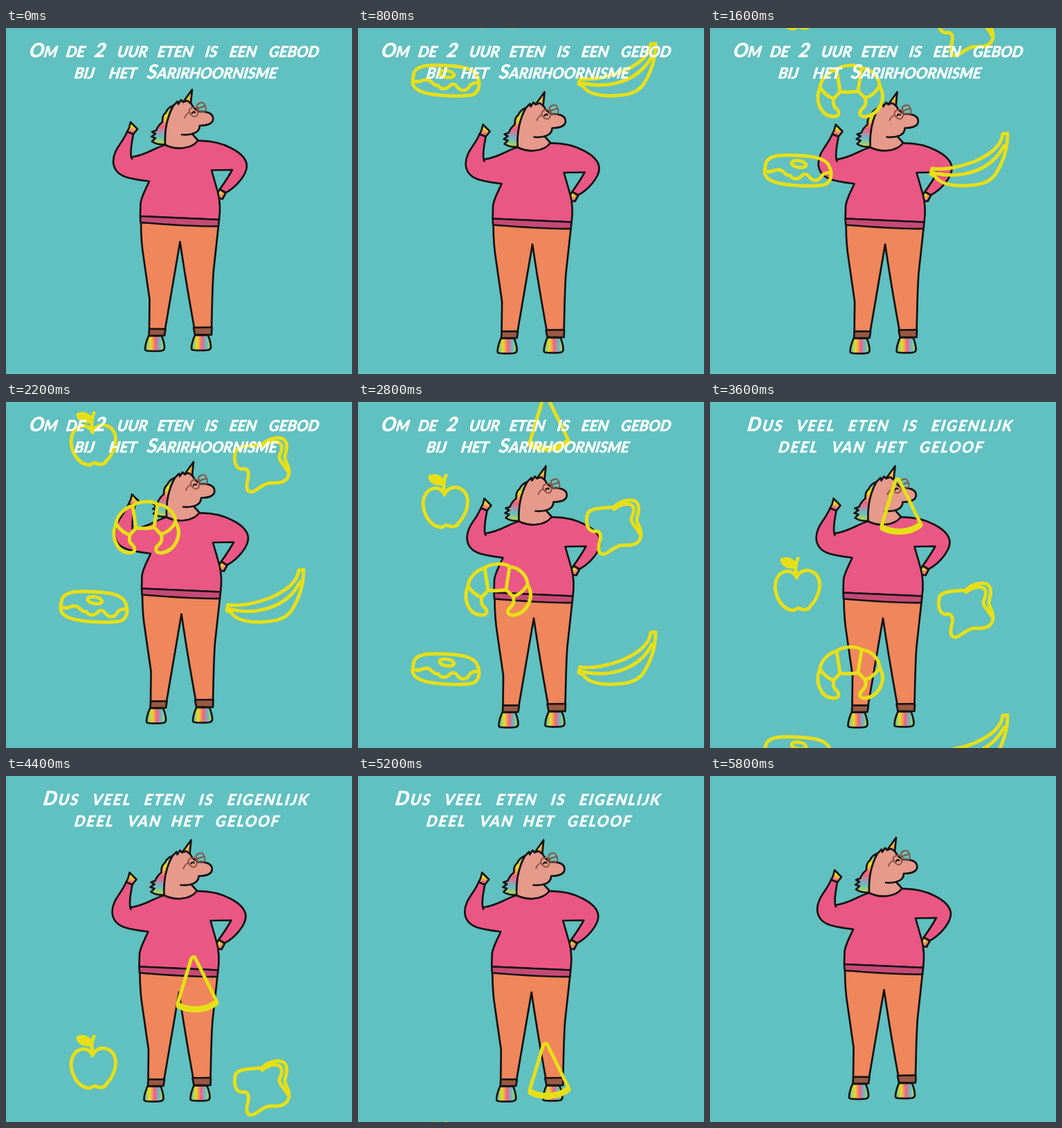
An HTML page with a canvas that plays this animation: 500x500 px, repeating every 6 s.

```html
<!DOCTYPE html>
<html lang="nl">
<head>
<meta charset="utf-8">
<title>Om de 2 uur eten</title>
<style>
html, body { margin: 0; width: 100%; height: 100%; overflow: hidden; background: #61c0c0; }
canvas { display: block; width: 100vw; height: 100vh; }
</style>
</head>
<body>
<canvas id="stage" width="500" height="500"></canvas>
<script>
const ctx = document.getElementById('stage').getContext('2d');
const LOOP = 6000, STEP = 200;
const INK = '#151313', YELLOW = '#e6df17', SKIN = '#e59a8b', PINK = '#ea5785',
      HEM = '#c64a76', ORANGE = '#f0865b', CUFF = '#9a5942', FRAME = '#87513f';
const HUES = ['#63bfc4', '#a5cf6a', '#e6df17', '#f3a05c', '#f2607f', '#b08fa8'];

function rainbow(x0, y0, x1, y1, bands) {
  const g = ctx.createLinearGradient(x0, y0, x1, y1);
  for (let i = 0; i <= bands; i++) g.addColorStop(i / bands, HUES[i % HUES.length]);
  return g;
}

function shape(d, fill, stroke = INK, width = 2.7) {
  const p = new Path2D(d);
  if (fill) { ctx.fillStyle = fill; ctx.fill(p); }
  if (stroke) { ctx.strokeStyle = stroke; ctx.lineWidth = width; ctx.stroke(p); }
}

// Linear interpolation over [time, value] pairs
function track(keys, t) {
  for (let i = 1; i < keys.length; i++) {
    const [t0, a] = keys[i - 1], [t1, b] = keys[i];
    if (t <= t1) return a + (b - a) * (t - t0) / (t1 - t0);
  }
  return keys[keys.length - 1][1];
}

const shoe = (x, y) => `M${x + 5} ${y}C${x + 2} ${y + 7} ${x} ${y + 13} ${x} ${y + 19}` +
  `C${x} ${y + 22} ${x + 3} ${y + 21.5} ${x + 14} ${y + 22}C${x + 25} ${y + 22} ${x + 28} ${y + 21} ${x + 28} ${y + 17}` +
  `C${x + 28} ${y + 11} ${x + 26} ${y + 5} ${x + 24} ${y}Z`;

function drawLegs() {
  shape(shoe(201, 445), rainbow(202, 0, 230, 0, 8));
  shape(shoe(268, 444), rainbow(269, 0, 297, 0, 8));
  shape('M195 281C195 300 196 315 199 333L207.500 392L207 435L230 435L251.500 309Q259.500 364 272 433' +
    'L297 433C298 400 298 375 300 350L307 286Z', ORANGE);
  shape('M207 435L230.500 435L229 444.500L206.500 444.500Z', CUFF);
  shape('M271 433L297.500 432.500L297 443.500L273 443Z', CUFF);
}

function drawHead() {
  // mane
  shape('M242 112C236 114 233 117 231 122C226 126 226 131 226 136C222 139 219 143 217 148' +
    'L211 150L216 153L210 157L216 159L211 164C217 168 223 169 231 168C229 147 234 128 242 112Z',
    rainbow(226, 112, 222, 172, 8));
  // face and neck
  shape('M230 169C229 147 233 128 242 112L248 106L249 110L253 104L256 107L260 103L267 108' +
    'C269 113 273 118 280 121C289 120 298 123 299 129C301 137 293 141 280 141' +
    'C280 146 277 151 269 153L278 163C268 175 246 177 230 169Z', SKIN);
  shape('M254 154C260 155 265 154 270 153');
  // horn
  shape('M256 107L269 89L267 109L262 105Z', rainbow(256, 98, 272, 104, 5));
  // glasses
  shape('M265 118C268 114 274 113 276 117C278 121 278 126 274 128C270 129 264 124 265 118Z', null, FRAME, 1.9);
  shape('M276 112C277 109 284 106 286 109C288 112 290 117 288 120C285 122 280 122 278 119Z', null, FRAME, 1.9);
  shape('M276 118L279 116M265 122C261 124 259 126 258 130M278 116L287 113', null, FRAME, 1.9);
  shape('M269 123C270 121 272 121 273 122', null, INK, 2.5);
}

function drawBody() {
  shape('M180 136L190 146L184 153.500L175 150L178 144Z', rainbow(182, 134, 178, 154, 5));
  shape('M309 233L317.500 238.500L313 247L307 246L306 238Z', rainbow(306, 231, 318, 250, 6));
  shape('M230 169C214 173 203 184 181 186.500C179 177 182 165 184 153.500L175 150' +
    'C168 167 155 176 155 193C156 214 175 218 207 221.500C202 233 196 243 194.500 253L194 272' +
    'L308 277C310 262 309 248 306 237L297 205.500L327 205C321 216 314 226 309 233L317.500 238' +
    'C331 231 348 213 348 199C347 180 312 162 277 163C268 175 246 177 230 169Z', PINK);
  shape('M181 186.500L182 189');
  shape('M194 272L308 277L307 286.500C270 287 232 284 194.500 281Z', HEM);
}

const FOOD = [
  // donut
  'M80 380C80 364 101 363 121 364C147 365 166 367 172 379C178 391 175 405 163 407C137 410 97 407 86 399C78 394 78 388 80 380Z' +
  'M80 386C88 391 94 383 101 385C108 387 108 394 116 393C119 399 127 399 131 395C136 390 141 390 144 396' +
  'C149 402 156 401 160 396C162 390 168 389 174 389' +
  'M118 375C119 369 137 371 139 378C138 384 118 382 118 375Z',
  // banana
  'M423 333L430 332.500C430 352 424 374 412 392C401 407 382 407 366 408C349 408 332 405 325 394L319 391L321 383' +
  'C339 386 364 380 382 373C407 362 422 348 423 333Z' +
  'M321 389C363 399 406 387 425 350',
  // croissant
  'M183 240C191 233 212 232 219 238L214 271C206 273 196 273 188 272Z' +
  'M183 240C171 243 160 254 159 266C165 275 171 280 179 282L188 272' +
  'M159 266C151 283 159 307 178 308C188 308 188 301 181 295C177 291 178 286 179 282' +
  'M219 238C233 239 245 251 245 264C239 274 232 279 224 281L214 271' +
  'M245 264C256 281 245 304 226 308C216 309 214 302 220 297C226 291 226 287 224 281',
  // apple
  'M125 134C120 119 95 121 94 147C95 163 104 179 119 181C123 182 123 178 129 178C137 182 143 180 145 175' +
  'C155 165 160 151 158 139C154 120 131 118 125 134Z' +
  'M125 133C123 123 124 113 127 106M124 118C112 120 104 114 104 108C111 105 121 107 124 118ZM107 109L123 117',
  // bread
  'M331 165C331 154 348 153 370 152C377 143 398 137 404 147C409 156 402 165 403 172C405 179 410 184 409 193' +
  'C407 208 393 207 381 207C368 209 362 220 354 220C345 219 348 208 350 199C352 191 348 185 342 187C332 187 329 176 331 165Z' +
  'M370 155C380 147 393 144 398 152C401 160 394 166 395 171C397 178 404 183 407 190',
  // pizza sides
  'M248 59L267 -4C269 -10 273 -10 275 -4L305 57'
];
const foodPaths = FOOD.map(d => new Path2D(d));

function drawFood(dy) {
  ctx.save();
  ctx.translate(0, dy);
  ctx.strokeStyle = YELLOW;
  ctx.lineWidth = 5;
  foodPaths.forEach(p => ctx.stroke(p));
  shape('M250 62C266 70 289 69 303 58', null, YELLOW, 9);
  ctx.restore();
}

const TITLES = [
  { gap: 0, words: [['Om', 33, 42], ['de', 86, 42], ['2', 127, 42], ['uur', 160, 42], ['eten', 218, 42],
    ['is', 287, 42], ['een', 322, 42], ['gebod', 379, 42],
    ['bij', 98, 73], ['het', 148, 73], ['Sarirhoornisme', 203, 73]] },
  { gap: 2, words: [['Dus', 53, 42], ['veel', 124, 42], ['eten', 199, 42], ['is', 278, 42], ['eigenlijk', 319, 42],
    ['deel', 98, 73], ['van', 175, 73], ['het', 238, 73], ['geloof', 302, 73]] }
];

function drawTitle({ gap, words }) {
  ctx.fillStyle = ctx.strokeStyle = '#fff';
  ctx.lineWidth = 0.7;
  ctx.letterSpacing = gap + 'px';
  for (const [word, x, y] of words) {
    ctx.save();
    ctx.transform(1, 0, -0.16, 1, x, y);
    let pen = 0;
    for (const part of word.match(/[A-Z0-9]|[a-z]+/g)) {
      ctx.font = `italic bold ${/[a-z]/.test(part) ? 22 : 28}px Lato, "Open Sans", sans-serif`;
      const caps = part.toUpperCase();
      ctx.fillText(caps, pen, 0);
      ctx.strokeText(caps, pen, 0);
      pen += ctx.measureText(caps).width;
    }
    ctx.restore();
  }
}

const FALL = [[0, -130], [800, 0], [1600, 130], [2800, 310], [3600, 430], [4400, 580], [4600, 580], [5800, 830]];
const SWAY = [[0, 0], [800, 0.6], [1600, 1.6], [2800, 2.5], [3600, -1.5], [4600, -1.5], [5800, 0]];

function bob(t) {
  if (t === 0 || t === 5800) return 0;
  return t / STEP % 2 ? -2.5 : 3.5;
}

function draw(now) {
  let t = Math.floor(now % LOOP / STEP) * STEP;
  if (t === 4600) t = 4400;   // held pose
  ctx.fillStyle = '#61c0c0';
  ctx.fillRect(0, 0, 500, 500);
  ctx.lineJoin = ctx.lineCap = 'round';

  ctx.save();
  ctx.translate(track(SWAY, t), bob(t));
  drawLegs();
  drawHead();
  drawBody();
  ctx.restore();

  if (t > 0 && t < 5800) drawFood(track(FALL, t) - 310);
  if (t < 3200) drawTitle(TITLES[0]);
  else if (t < 5600) drawTitle(TITLES[1]);
}

const start = performance.now();
function tick() {
  draw(performance.now() - start);
  requestAnimationFrame(tick);
}
tick();
</script>
</body>
</html>
```
